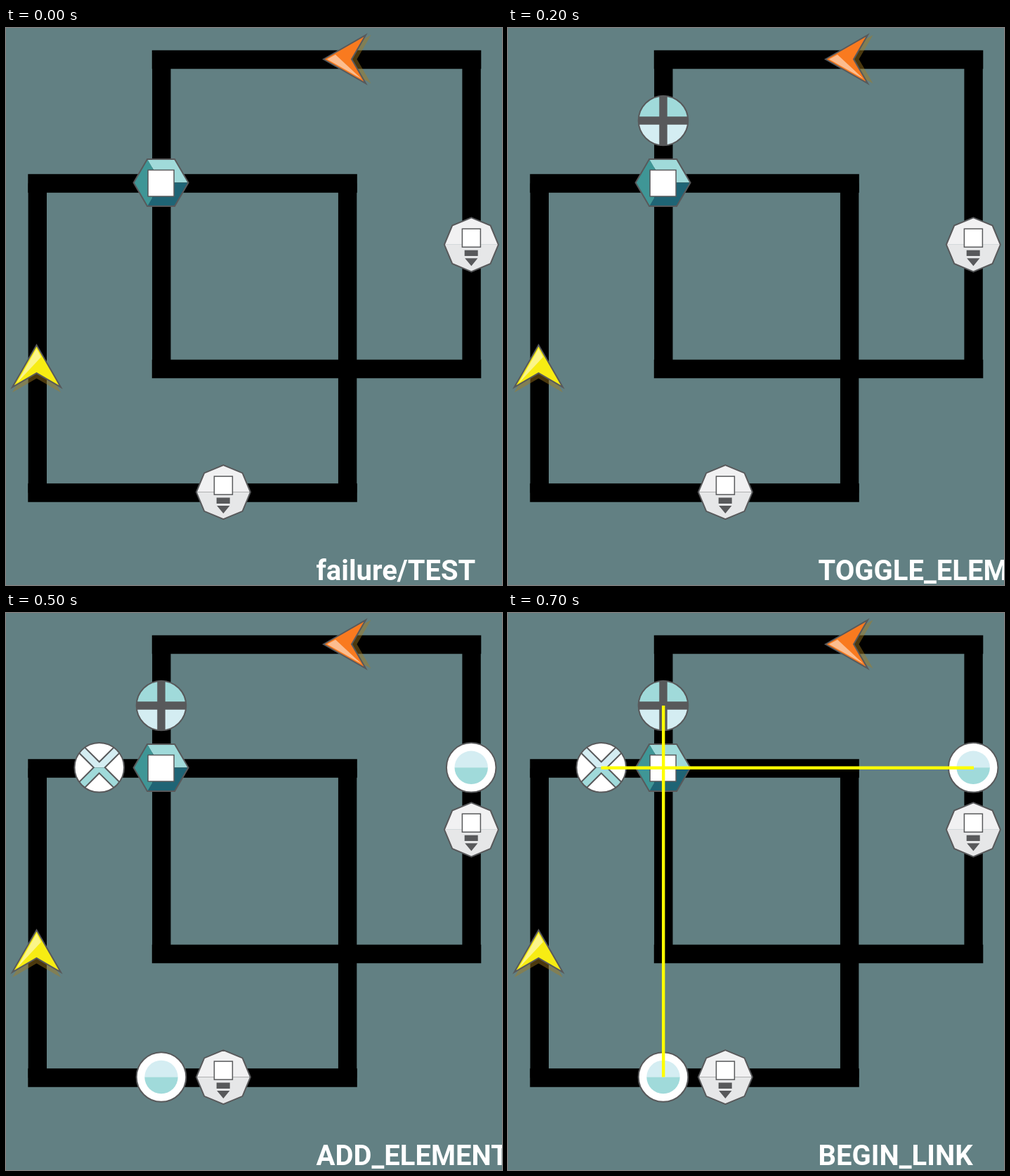
Animation, 706 px wide and 794 px high, one loop 0.8 s. Source, as an HTML page:

```html
<!DOCTYPE html>
<html lang="en">
<head>
<meta charset="utf-8">
<title>Track steps</title>
<style>
  html, body { margin: 0; width: 100%; height: 100%; overflow: hidden; background: #628083; }
  svg { display: block; width: 706px; height: 794px; }
  text { font: 700 40px Roboto, Arial, sans-serif; fill: #fff; }
  .line { stroke: #58595b; stroke-width: 2; }
  .thin { stroke: #58595b; stroke-width: 1.5; }
  .ink { fill: #58595b; }
  .pale { fill: #d4edf2; }
  .aqua { fill: #a0dada; }
  .link { stroke: #ff0; stroke-width: 4.4; }
</style>
</head>
<body>
<svg viewBox="0 0 706 794">
  <defs>
    <clipPath id="disc"><circle r="35.5"/></clipPath>

    <g id="loop">
      <path d="M-13.5 0H455M-13.5 441H455" stroke="#000" stroke-width="26.4"/>
      <path d="M0 0V441M441.3 0V441" stroke="#000" stroke-width="26.4"/>
    </g>

    <path id="dart" d="M0-30 34.5 30 0 10-34.5 30Z"/>
    <g id="arrow">
      <use href="#dart" y="7.5" fill="#a67c1e" opacity=".45"/>
      <use href="#dart" class="line"/>
      <path d="M0-25 6.5-13-28 24Z" fill="#fff" opacity=".5"/>
    </g>

    <g id="lever">
      <path d="M-38.5 0-27.2-27.2 0-38.5 27.2-27.2 38.5 0Z" fill="#f1f1f2"/>
      <path d="M-38.5 0-27.2 27.2 0 38.5 27.2 27.2 38.5 0Z" fill="#e6e7e8"/>
      <path d="M0-38.5 27.2-27.2 38.5 0 27.2 27.2 0 38.5-27.2 27.2-38.5 0-27.2-27.2Z" fill="none" class="line"/>
      <rect x="-13" y="-22.5" width="26" height="26" fill="#fff" class="thin"/>
      <path d="M-9.7 8H9.3V16.3H-9.7ZM-9.2 19.5H9L0 30.5Z" class="ink"/>
    </g>

    <g id="gem">
      <path d="M0 0-19.5-33.5H19.5L39 0Z" class="aqua"/>
      <path d="M0 0H39L19.5 33.5H-19.5Z" fill="#1f6475"/>
      <path d="M0 0-19.5 33.5-39 0-19.5-33.5Z" fill="#3f9696"/>
      <path d="M-39 0-19.5-33.5H19.5L39 0 19.5 33.5H-19.5Z" fill="none" class="line"/>
      <rect x="-18.5" y="-18" width="37" height="37.5" fill="#fff" class="thin"/>
    </g>

    <g id="cross">
      <g clip-path="url(#disc)">
        <path d="M-36-36H36V0H-36Z" class="pale"/>
        <path d="M-36 0H36V36H-36Z" class="aqua"/>
        <path d="M0-8-40-48H40ZM0 8-40 48H40ZM-8 0-48-40V40ZM8 0 48-40V40Z" fill="#fff" class="line"/>
      </g>
      <circle r="35.3" fill="none" class="line"/>
    </g>

    <g id="plus">
      <g clip-path="url(#disc)">
        <path d="M-36-36H36V0H-36Z" class="aqua"/>
        <path d="M-36 0H36V36H-36Z" class="pale"/>
        <path d="M-36 0H36M0-36V36" stroke="#58595b" stroke-width="11.4"/>
      </g>
      <circle r="35.3" fill="none" class="line"/>
    </g>

    <g id="button">
      <circle r="35.3" fill="#fff" class="line"/>
      <path d="M-23.7 0A23.7 23.7 0 0 1 23.7 0Z" class="pale"/>
      <path d="M-23.7 0A23.7 23.7 0 0 0 23.7 0Z" class="aqua"/>
    </g>
  </defs>

  <use href="#loop" x="221.3" y="45"/>
  <use href="#loop" x="44.8" y="221.5"/>
  <use href="#arrow" transform="translate(482 44.5) rotate(-90)" fill="#f97a1f"/>
  <use href="#arrow" transform="translate(43.5 482)" fill="#f7ec13"/>
  <use href="#lever" x="662.4" y="308.8"/>
  <use href="#lever" x="309.4" y="661.6"/>
  <use href="#gem" x="220.6" y="220.5"/>

  <!-- data-on: first and last step in which a part shows -->
  <use href="#cross" x="221" y="132" data-on="1 1"/>
  <use href="#plus" x="221" y="132" data-on="2 7"/>
  <use href="#cross" x="132.8" y="220.3" data-on="3 7"/>
  <use href="#button" x="221" y="661.5" data-on="4 7"/>
  <use href="#button" x="662.2" y="220.3" data-on="5 7"/>
  <path d="M221.2 132V661.5" class="link" data-on="6 7"/>
  <path d="M132.5 220.8H663" class="link" data-on="7 7"/>
  <text id="label" x="441.5" y="787"></text>
</svg>
<script>
  const STEP = 100;
  const labels = [
    "failure/TEST", "ADD_ELEMENT", "TOGGLE_ELEMENT", "ADD_ELEMENT",
    "ADD_ELEMENT", "ADD_ELEMENT", "BEGIN_LINK", "BEGIN_LINK"
  ];
  const label = document.getElementById("label");
  const parts = [...document.querySelectorAll("[data-on]")].map(el => {
    const [first, last] = el.dataset.on.split(" ").map(Number);
    return { el, first, last };
  });
  let shown = -1;

  function show(step) {
    if (step === shown) return;
    shown = step;
    label.textContent = labels[step];
    for (const { el, first, last } of parts) {
      el.style.display = step >= first && step <= last ? "" : "none";
    }
  }

  function tick() {
    show(Math.floor(performance.now() / STEP) % labels.length);
    requestAnimationFrame(tick);
  }
  tick();
</script>
</body>
</html>
```
